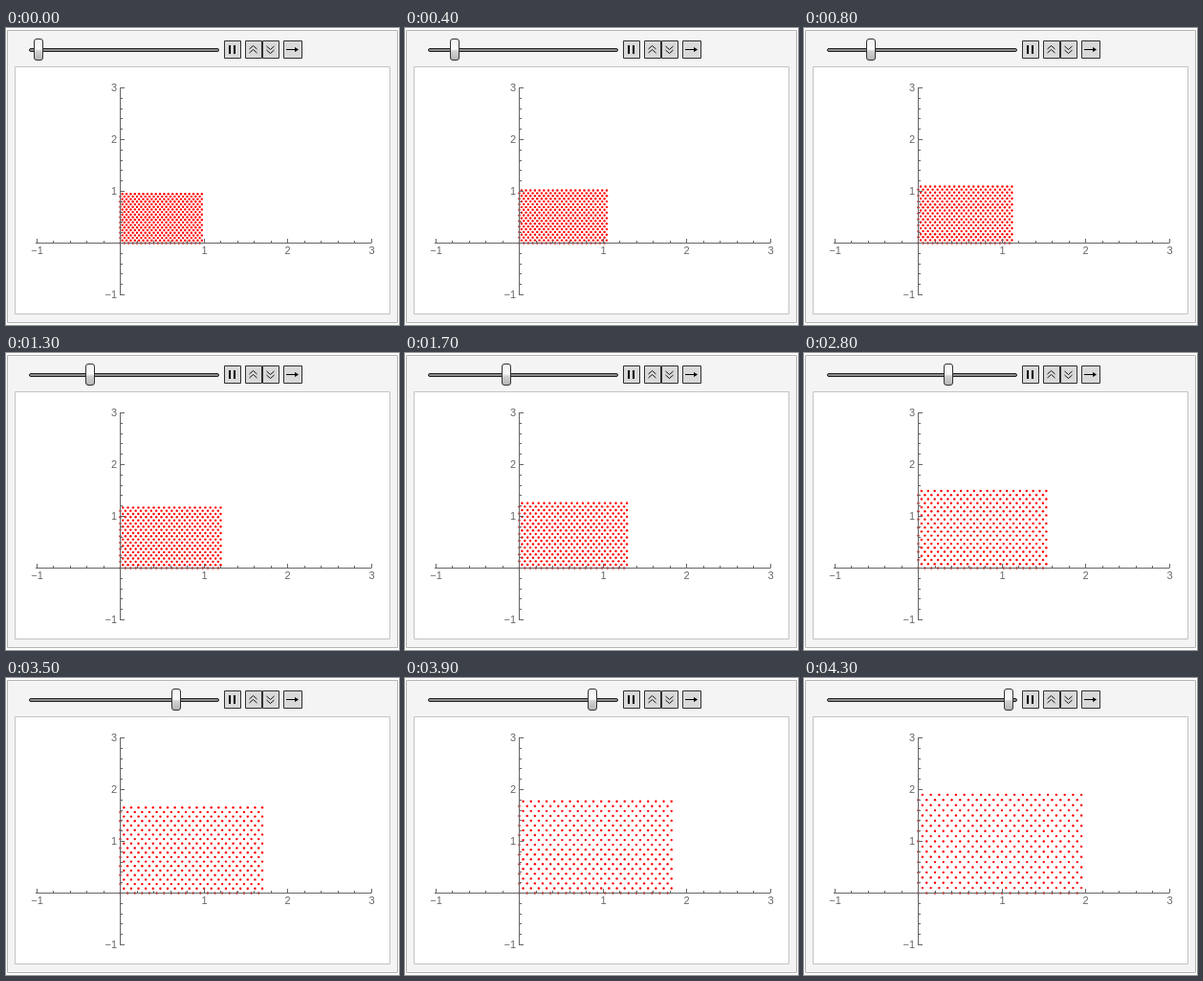
An HTML page with a canvas for the animation above (4500 ms loop, 411x310 px).

```html
<!DOCTYPE html>
<html lang="en">
<head>
<meta charset="utf-8">
<title>Scaling lattice</title>
<style>
html, body { margin: 0; width: 100%; height: 100%; overflow: hidden; background: #fff; }
canvas { display: block; }
</style>
</head>
<body>
<canvas id="stage" width="411" height="310"></canvas>
<script>
const ctx = document.getElementById('stage').getContext('2d');
const LOOP = 4500, STEPS = 20;
const X0 = 119.5, Y0 = 224.5, UX = 87.5, UY = 54;
const snap = v => Math.floor(v) + 0.5;

function box(x, y, w, h, r, fill, stroke) {
  ctx.beginPath();
  ctx.roundRect(x, y, w, h, r);
  ctx.fillStyle = fill;
  ctx.fill();
  ctx.strokeStyle = stroke;
  ctx.lineWidth = 1;
  ctx.stroke();
}

function line(color, width, ...pts) {
  ctx.beginPath();
  for (let i = 0; i < pts.length; i += 2) ctx.lineTo(pts[i], pts[i + 1]);
  ctx.strokeStyle = color;
  ctx.lineWidth = width;
  ctx.stroke();
}

function buttons() {
  for (const [x, w] of [[228.5, 17], [250.5, 17], [268.5, 17], [290.5, 19]])
    box(x, 13.5, w, 18, 0, '#d9d9d9', '#303030');
  ctx.fillStyle = '#000';
  ctx.fillRect(233, 18, 2, 9);
  ctx.fillRect(238, 18, 2, 9);
  for (const y of [22, 26]) line('#111', 1, 254.5, y, 258.5, y - 3.5, 262.5, y);
  for (const y of [19, 23]) line('#111', 1, 272.5, y, 276.5, y + 3.5, 280.5, y);
  line('#000', 1, 293, 22.5, 303, 22.5);
  ctx.beginPath();
  ctx.moveTo(306, 22.5);
  ctx.lineTo(302, 20);
  ctx.lineTo(302, 25);
  ctx.fill();
}

function slider(x) {
  box(24.5, 21.5, 198, 3, 1.5, '#8c8c8c', '#222');
  const shade = ctx.createLinearGradient(0, 12, 0, 34);
  shade.addColorStop(0, '#f2f2f2');
  shade.addColorStop(0.45, '#fafafa');
  shade.addColorStop(0.55, '#d2d2d2');
  shade.addColorStop(1, '#b4b4b4');
  box(x - 4.5, 11.5, 9, 22, 2.5, shade, '#333');
}

function dots(scale) {
  ctx.fillStyle = '#f00';
  for (let j = 0; j < 20; j++)
    for (let i = 0; i < 20; i++) {
      const x = (i + (j % 2) / 2) / 20, y = j / 20;
      ctx.beginPath();
      ctx.arc(X0 + x * scale * UX, Y0 - y * scale * UY, 1.2, 0, 7);
      ctx.fill();
    }
}

function axes() {
  const color = '#666';
  line(color, 1, 31, Y0, 382, Y0);
  line(color, 1, X0, 62, X0, 279);
  ctx.font = '11px "Liberation Sans", Arial, sans-serif';
  ctx.textBaseline = 'alphabetic';
  for (let n = -5; n <= 15; n++) {
    if (!n) continue;
    const major = n % 5 === 0, size = major ? 4.5 : 2.5;
    const x = snap(X0 + n / 5 * UX), y = snap(Y0 - n / 5 * UY);
    line(color, 1, x, Y0, x, Y0 - size);
    line(color, 1, X0, y, X0 + size, y);
    if (!major) continue;
    const label = String(n / 5).replace('-', '\u2212');
    ctx.fillStyle = '#666';
    ctx.textAlign = 'center';
    ctx.fillText(label, x, 236);
    ctx.textAlign = 'right';
    ctx.fillText(label, 116, y + 3.5);
  }
}

// Steps last 200 ms, every fifth one 300 ms.
function stepAt(t) {
  let k = STEPS;
  while (k && t < 200 * k + 100 * Math.floor((k - 1) / 5)) k--;
  return k;
}

function draw() {
  const k = stepAt(performance.now() % LOOP);
  ctx.fillStyle = '#fff';
  ctx.fillRect(0, 0, 411, 310);
  box(1.5, 2.5, 408, 305, 0, '#f4f4f4', '#b4b4b4');
  box(9.5, 40.5, 392, 258, 0, '#fff', '#c4c4c4');
  slider(34 + 9 * k);
  buttons();
  dots(2 ** (k / STEPS));
  axes();
  requestAnimationFrame(draw);
}
draw();
</script>
</body>
</html>
```
